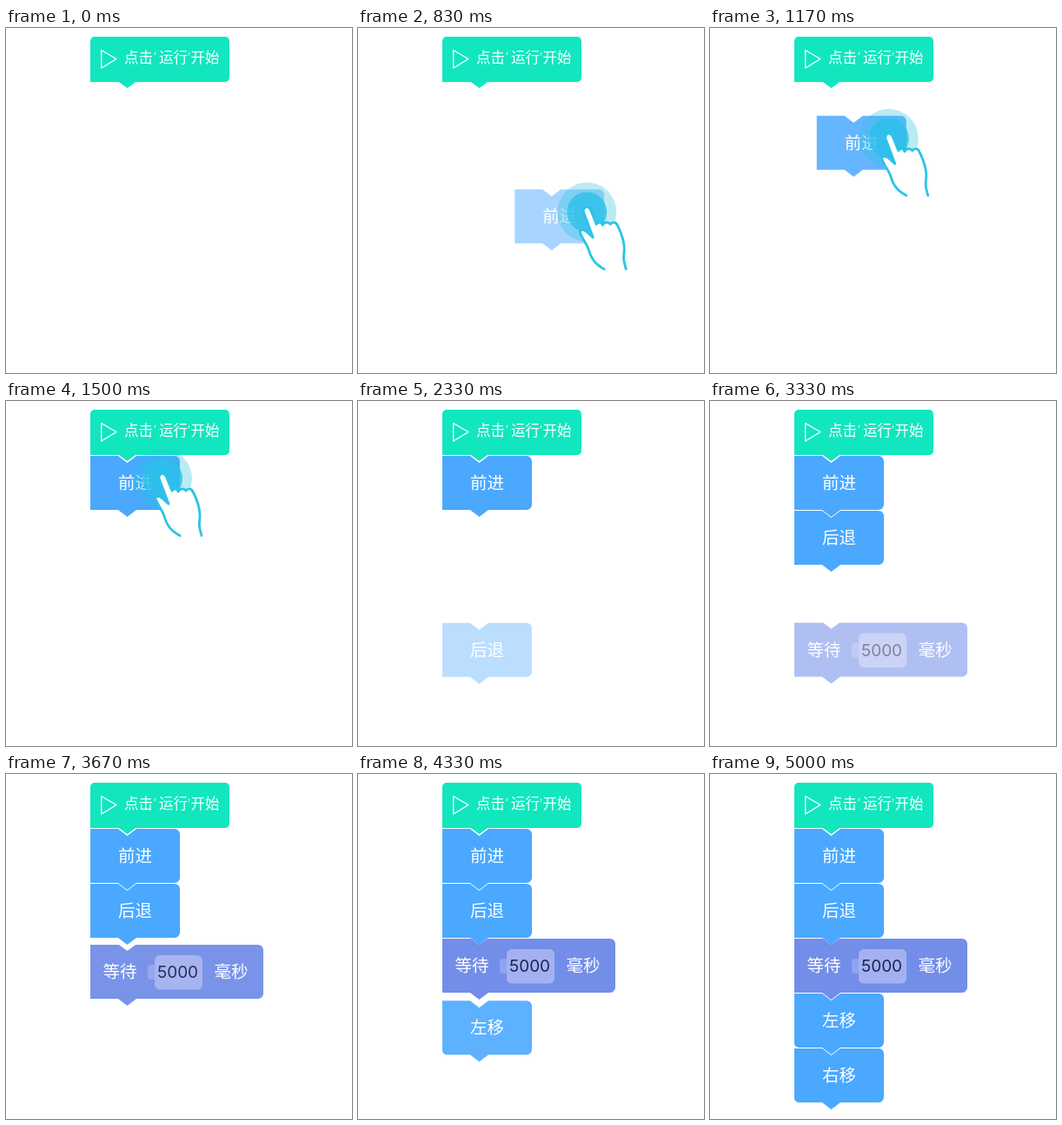
An HTML page that plays this animation: 398x396 px, repeating every 8 s.

```html
<!DOCTYPE html>
<html lang="zh-CN">
<head>
<meta charset="utf-8">
<style>
  html, body { margin: 0; width: 100%; height: 100%; overflow: hidden; background: #fff; }
  svg { display: block; }
  text { font: 300 19.5px "Noto Sans CJK SC", "Noto Sans CJK", sans-serif; fill: #fff; }
  .start { font-size: 16.5px; }
  .quote { font-family: Roboto, sans-serif; }
  .number { font: 400 19px Inter, sans-serif; fill: #1c2450; }
</style>
</head>
<body>
<svg width="398" height="396" viewBox="0 0 398 396">
  <path fill="#12e6be" d="M97 62V15a5 5 0 0 1 5-5H252a5 5 0 0 1 5 5V57a5 5 0 0 1-5 5H149L139.5 69L130 62Z"/>
  <path fill="none" stroke="#fff" stroke-width="1.3" stroke-linejoin="round" d="M109.7 25.5L127 35.5L109.7 46Z"/>
  <text class="start" y="40.3"><tspan x="136">点击</tspan><tspan class="quote" x="170">‘</tspan><tspan x="176">运行</tspan><tspan class="quote" x="209">'</tspan><tspan x="212.5">开始</tspan></text>
  <g id="blocks"></g>
  <g id="hand">
    <circle cx="180" cy="89" r="34" fill="#29c0e0" opacity=".32"/>
    <circle cx="180" cy="89" r="23" fill="#29c0ea" opacity=".78"/>
    <path fill="#fff" stroke="#2bc3e6" stroke-width="2.8" stroke-linecap="round" stroke-linejoin="round"
      d="M200 154.500C190 149 185 143 182 132C179 124 174 119 172 112C172 109 176 109 179 111C182 113 184 116 187 118L176.500 90C174.500 84 181 80 184.500 87L191 103C193 100 197 100 198 104C200 100 205 100 207 103C209 100 213 100 215 104C219 112 225 125 222.500 138C221.500 145 224 150 225 154.500"/>
  </g>
</svg>
<script>
const LEFT = 97, STEP = 1000 / 12, LOOP = 8000, BLUE = '#4aa8ff';

// first/end: steps of entrance; dx/dy: offset at the first step; p: easing power
const blocks = [
  { y: 63, label: '前进', first: 7, end: 17.37, dx: 139, dy: 204, p: 1.5 },
  { y: 126, label: '后退', first: 27, end: 36, dx: 0, dy: 165, p: 2.1 },
  { y: 189, wait: true, first: 38, end: 46, dx: 0, dy: 118, p: 2.04 },
  { y: 252, label: '左移', first: 48, end: 54, dx: 0, dy: 60, p: 1.8, r: 5 },
  { y: 315, label: '右移', first: 56, end: 60, dx: 0, dy: 7, p: 2, r: 5 }
];

const shape = (w, r, notch) =>
  `M0 0${notch}H${w - 6}a6 6 0 0 1 6 6V56a6 6 0 0 1-6 6H53L42.5 70L32 62H${r}` +
  (r ? `a${r} ${r} 0 0 1-${r}-${r}` : '') + 'Z';

const label = (x, s) => `<text x="${x}" y="37.900" text-anchor="middle">${s}</text>`;

function markup({ wait, label: s, r = 0 }) {
  if (!wait) return `<path fill="${BLUE}" d="${shape(103, r, 'H32L42.5 8L53 0')}"/>` + label(51.5, s);
  return `<path fill="#738ee8" d="${shape(199, r, 'H33L42.5 7L52 0')}"/>
    <rect x="66" y="23" width="14" height="17" rx="4" fill="#91a3ee"/>
    <rect x="74" y="12" width="55" height="39.500" rx="6" fill="#a3b1f0"/>
    <text class="number" x="100.500" y="38" text-anchor="middle">5000</text>` +
    label(34, '等待') + label(162, '毫秒');
}

const hand = document.getElementById('hand');
const layer = document.getElementById('blocks');
for (const b of blocks) {
  b.el = document.createElementNS('http://www.w3.org/2000/svg', 'g');
  b.el.innerHTML = markup(b);
  layer.prepend(b.el); // earlier tabs lie above later notches
}

const clamp = v => Math.max(0, Math.min(1, v));

function draw(now) {
  const k = Math.floor((now % LOOP + 4) / STEP);
  for (const b of blocks) {
    const left = Math.max(0, b.end - k), span = b.end - b.first;
    const e = (left / span) ** b.p;
    b.el.setAttribute('transform', `translate(${LEFT + b.dx * e} ${b.y + b.dy * e})`);
    b.el.setAttribute('opacity', k < b.first ? 0 : 1 - (left / (span + 1)) ** b.p);
    if (b === blocks[0]) hand.setAttribute('transform', `translate(${b.dx * e} ${b.dy * e})`);
  }
  hand.setAttribute('opacity', Math.min(clamp((k - 6) / 3), clamp((24 - k) / 6)));
}

const start = performance.now();
(function tick() {
  draw(performance.now() - start);
  requestAnimationFrame(tick);
})();
</script>
</body>
</html>
```
